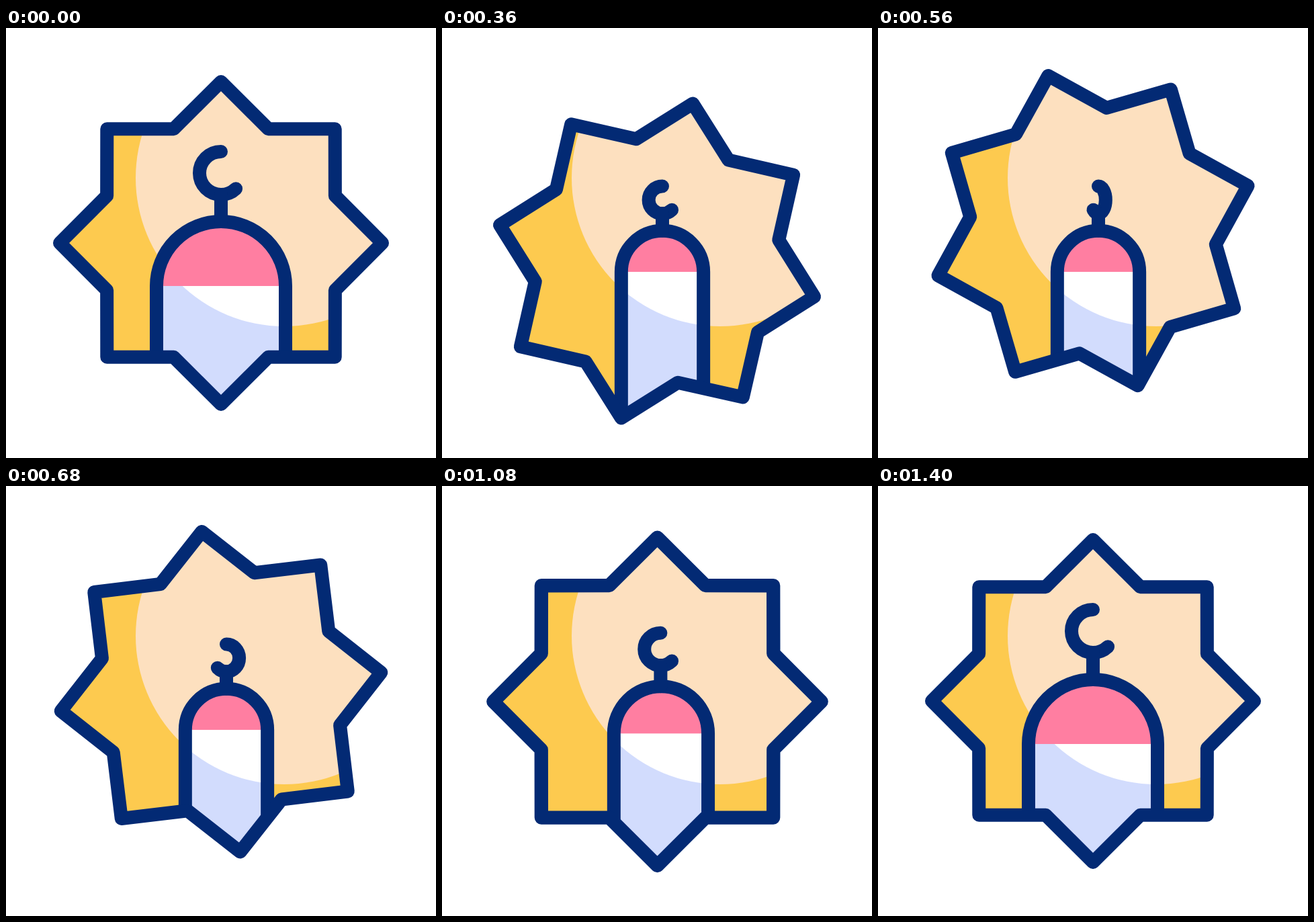
An HTML page with a canvas that plays this animation: 640 px wide and 640 px high, repeating every 1480 ms.

```html
<!DOCTYPE html>
<html lang="en">
<head>
<meta charset="utf-8">
<title>Dome in a star</title>
<style>
  html, body { margin: 0; height: 100%; overflow: hidden; background: #fff; }
  canvas { display: block; }
</style>
</head>
<body>
<canvas id="stage" width="640" height="640"></canvas>
<script>
const LOOP = 1480;
const NAVY = '#032a74', YELLOW = '#fdca4f', CREAM = '#fde0bf';
const PINK = '#ff7ea1', BLUE = '#d2dcfd', WHITE = '#fff';
const ctx = document.getElementById('stage').getContext('2d');

// Cubic timing curve with flat ends; x1 and x2 set how long they stay flat.
function ease(x, x1 = 1 / 3, x2 = 2 / 3) {
  let lo = 0, hi = 1, s = 0.5;
  for (let i = 0; i < 20; i++) {
    s = (lo + hi) / 2;
    const at = 3 * x1 * s * (1 - s) ** 2 + 3 * x2 * s * s * (1 - s) + s ** 3;
    if (at < x) lo = s; else hi = s;
  }
  return s * s * (3 - 2 * s);
}

// Value at time t between [time, value, x1, x2] keys.
function track(t, ...keys) {
  if (t <= keys[0][0]) return keys[0][1];
  for (let i = 1; i < keys.length; i++) {
    const [t0, v0] = keys[i - 1], [t1, v1, x1, x2] = keys[i];
    if (t < t1) return v0 + (v1 - v0) * ease((t - t0) / (t1 - t0), x1, x2);
  }
  return keys[keys.length - 1][1];
}

function starPath(cx, cy, scale, turn) {
  const path = new Path2D();
  for (let i = 0; i < 16; i++) {
    const r = scale * (i % 2 ? 183.85 : 240);
    const a = turn + i * Math.PI / 8;
    path.lineTo(cx + r * Math.sin(a), cy - r * Math.cos(a));
  }
  path.closePath();
  return path;
}

const placeX = k => 342 - 22 * k;
const placeY = (y, k) => 326 + (y - 326) * k;

function domePath(k) {
  const x = placeX(k), y = placeY(384, k), r = 96 * k;
  const path = new Path2D();
  path.moveTo(x - r, 640);
  path.arc(x, y, r, Math.PI, 0);
  path.lineTo(x + r, 640);
  return path;
}

function fillCircle(color) {
  ctx.fillStyle = color;
  ctx.beginPath();
  ctx.arc(414, 223, 221, 0, 2 * Math.PI);
  ctx.fill();
}

function fillRect(color, y, height) {
  ctx.fillStyle = color;
  ctx.fillRect(0, y, 640, height);
}

function drawMoon(k, spin, domeTop) {
  const x = placeX(k);
  ctx.beginPath();
  ctx.save();
  ctx.translate(x, placeY(216, k));
  ctx.scale(k * spin, k);
  ctx.arc(0, 0, 32, -Math.PI / 2, 0.81, true);
  ctx.restore();
  ctx.stroke();
  ctx.beginPath();
  ctx.moveTo(x, placeY(248, k));
  ctx.lineTo(x, domeTop);
  ctx.stroke();
}

function draw(t) {
  const turn = track(t, [83, 0], [833, Math.PI / 4, 0.315, 0.777]);
  const bounce = track(t, [83, 0], [365, 26.5], [595, -21.2], [810, 0]);
  const swell = track(t, [1000, 0], [1205, 0.05], [1390, 0]);
  const domeSize = track(t, [83, 1], [360, 0.637], [925, 0.637], [1395, 1]);
  const moonSize = track(t, [83, 1], [360, 0.637], [890, 0.637], [1390, 1]);
  const spin = track(t, [367, 1], [650, -1], [945, 1]);

  const star = starPath(320 + 30 * swell, 320 + 50 * swell + bounce, 1 + swell, turn);
  const dome = domePath(domeSize);

  ctx.clearRect(0, 0, 640, 640);
  ctx.lineCap = ctx.lineJoin = 'round';
  ctx.strokeStyle = NAVY;
  ctx.lineWidth = 20;

  ctx.save();
  ctx.clip(star);
  fillRect(YELLOW, 0, 640);
  fillCircle(CREAM);
  ctx.save();
  ctx.clip(dome);
  fillRect(BLUE, 0, 640);
  fillCircle(WHITE);
  fillRect(PINK, 0, placeY(384, domeSize));
  ctx.restore();
  ctx.stroke(dome);
  ctx.restore();

  drawMoon(moonSize, spin, placeY(288, domeSize));
  ctx.lineWidth = 20 * (1 + swell);
  ctx.stroke(star);
}

function tick() {
  draw(performance.now() % LOOP);
  requestAnimationFrame(tick);
}
tick();
</script>
</body>
</html>
```
